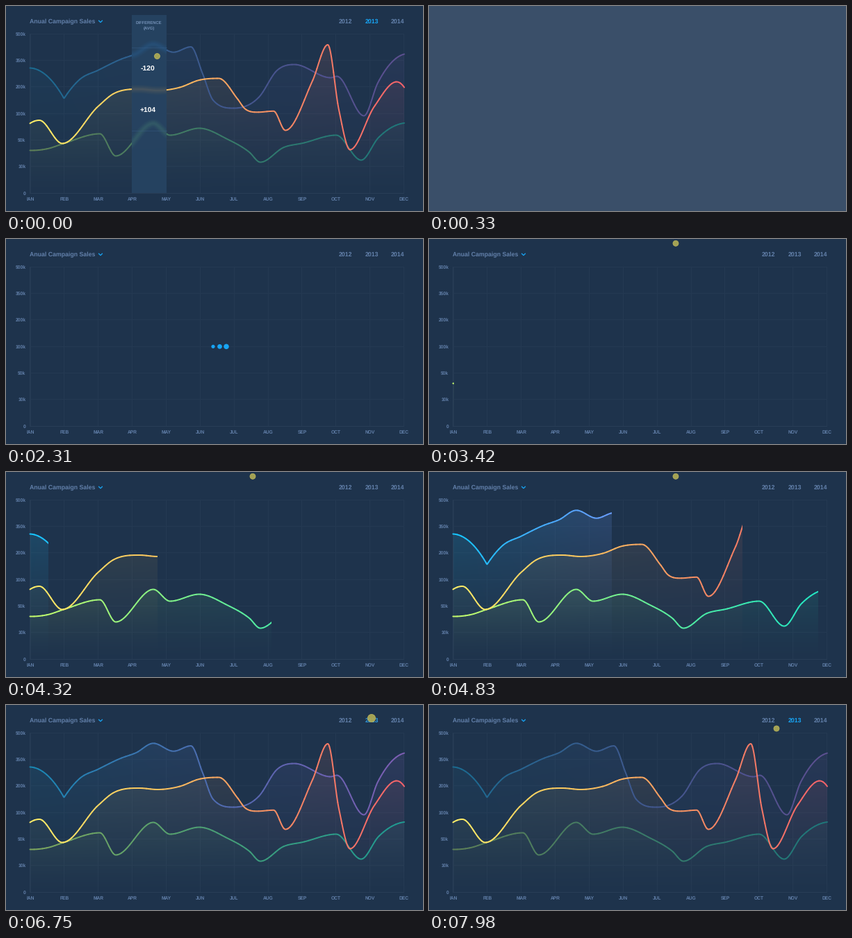
A matplotlib script that plays this animation: 600 px wide and 296 px high, repeating every 8000 ms.

```python
import numpy as np
import matplotlib.pyplot as plt
from matplotlib.animation import FuncAnimation
from matplotlib.collections import LineCollection
from matplotlib.colors import to_rgb
from matplotlib.patches import Circle, Rectangle
from matplotlib.transforms import Bbox

W, H, DPI = 600, 296, 100
LOOP, STEP = 8000, 20
PX = 72 / DPI
BG = np.array(to_rgb("#1e334c"))
FLAT = np.array(to_rgb("#3a4f69"))
LABEL = np.array(to_rgb("#6280aa"))
ACCENT = np.array(to_rgb("#17a5f5"))
LEFT, RIGHT, TOP, BOTTOM = 34.5, 573, 40, 270

plt.rcParams["font.family"] = "Liberation Sans"
plt.rcParams["font.weight"] = "bold"
plt.rcParams["text.hinting"] = "none"

X = np.linspace(LEFT, RIGHT, 1081)


def curve(*pts):
    """Smooth curve through key points, level at every peak and trough."""
    x, y = np.array(pts, float).T
    h = np.diff(x)
    d = np.diff(y) / h
    a, b = d[:-1], d[1:]
    m = (h[1:] * a + h[:-1] * b) / (h[1:] + h[:-1])
    limit = 3 * np.minimum(abs(a), abs(b))
    m = np.where(a * b > 0, np.clip(m, -limit, limit), 0)
    m = np.r_[2 * d[0] - m[0], m, 2 * d[-1] - m[-1]]
    k = np.clip(np.searchsorted(x, X) - 1, 0, len(h) - 1)
    s = np.clip((X - x[k]) / h[k], 0, 1)
    bend = h[k] * s * (1 - s) * (m[k] * (1 - s) - m[k + 1] * s)
    return y[k] + (y[k + 1] - y[k]) * smooth(s) + bend


def ramp(t, start, end):
    return min(max((t - start) / (end - start), 0), 1)


def smooth(u):
    return u * u * (3 - 2 * u)


KINK = 83.5
green_y = curve(
    (LEFT, 208.5), (60, 206), (83, 198.5), (135, 184.5), (158, 216.5),
    (212, 169.5), (236, 186.5), (278, 176.5), (318, 192), (350, 211),
    (366, 225.5), (400, 204), (427, 198), (475, 186.5), (511, 222.5),
    (536, 190), (RIGHT, 169))
amber_y = curve(
    (LEFT, 169.5), (48, 165), (81, 198.5), (133, 144.5), (155, 126.5),
    (192, 120), (218, 122), (250, 117.5), (278, 107), (306, 104.5),
    (333, 134), (344, 148.5), (362, 153.3), (385, 151.8), (402, 179.5),
    (441, 108), (463, 56), (479, 150), (495, 207.5), (530, 145),
    (562, 109.5), (RIGHT, 117.5))
blue_y = np.where(
    X < KINK,
    curve((LEFT, 89.5), (59, 101), (KINK, 133.5)),
    curve((KINK, 133.5), (105, 107), (133, 92.5), (165, 77), (187, 69),
          (212, 55.3), (241, 66.7), (266, 59), (283, 98), (298, 136),
          (328, 147.5), (364, 131.5), (390, 93), (415, 84.5), (467, 103.5),
          (476, 101.5), (515, 158.5), (535, 111), (RIGHT, 69.5)))


def gradient(colors, x):
    """Colours spread evenly across the chart."""
    at = np.linspace(LEFT, RIGHT, len(colors))
    rgb = np.array([to_rgb(c) for c in colors])
    return np.stack([np.interp(x, at, rgb[:, i]) for i in range(3)], axis=-1)


fig = plt.figure(figsize=(W / DPI, H / DPI), dpi=DPI, facecolor=BG)
ax = fig.add_axes([0, 0, 1, 1])
ax.set_xlim(0, W)
ax.set_ylim(H, 0)
ax.axis("off")

# Background with grid
months_x = np.linspace(35, 572.5, 12)
rows_y = np.linspace(TOP, BOTTOM, 7)
base = np.tile(BG, (H, W, 1))
grid = BG + 6 / 255
for gx in months_x:
    base[TOP:BOTTOM + 1, int(gx)] = grid
for gy in rows_y:
    base[int(gy + .3), 35:573] = grid
base[TOP:BOTTOM + 1, 34] = base[BOTTOM, 35:573] = BG + 10 / 255

backdrop = ax.imshow(base, extent=(0, W, H, 0), interpolation="nearest",
                     aspect="auto")


class Series:
    CHUNK = 12

    def __init__(self, y, colors, fill, start, span, focus, z):
        self.y, self.start, self.span, self.focus = y, start, span, focus
        cols = np.arange(W) + .5
        yy = np.arange(H)[:, None] + .5
        fade = np.clip((BOTTOM - yy) / (BOTTOM - y.min()), 0, 1) ** 1.4
        under = np.clip(yy - np.interp(cols, X, y) + .5, 0, 1)
        inside = (cols > LEFT) & (cols < RIGHT)
        self.area = (fill * fade * under * inside)[..., None]
        self.tint = gradient(colors, cols)
        pts = np.column_stack([X, y])
        starts = range(0, len(X) - 1, self.CHUNK)
        self.rgb = gradient(colors, X[::self.CHUNK][:len(starts)])
        self.line = LineCollection(
            [pts[i:i + self.CHUNK + 1] for i in starts], colors=self.rgb,
            linewidths=2 * PX, capstyle="round", zorder=z)
        ax.add_collection(self.line)

    def reach(self, t):
        if t < 830:
            return RIGHT + 2
        u = ramp(t, self.start, self.start + self.span)
        if u == 0:
            return 0
        end = RIGHT + 2 if u == 1 else RIGHT
        return LEFT + (end - LEFT) * (u + smooth(u)) / 2

    def update(self, img, reach, dim):
        drop = 0 if self.focus else dim
        self.line.set_clip_box(Bbox.from_extents(0, 0, reach, H))
        self.line.set_color(BG + (self.rgb - BG) * (1 - .62 * drop))
        n = int(round(reach))
        part = img[:, :n]
        part += (self.tint[:n] - part) * self.area[:, :n] * (1 - .65 * drop)


series = [
    Series(green_y, ["#c4fb6c", "#88f284", "#48eaa8", "#20e6c6"],
           .1, 3420, 1475, False, 2),
    Series(blue_y, ["#16c6ff", "#5aa2fa", "#9088fa", "#c47eff"],
           .18, 4220, 1390, False, 3),
    Series(amber_y, ["#ffee68", "#f9c45e", "#f68a64", "#f6626a"],
           .12, 3810, 1400, True, 4),
]


def label(x, y, s, px, ha="center", color=LABEL, z=5):
    return ax.text(x, y + .36 * px, s, fontsize=px * PX, ha=ha, va="baseline",
                   color=color, zorder=z)


label(34, 21.5, "Anual Campaign Sales", 8.8, "left")
ax.plot([133.6, 136, 138.4], [21.2, 23.6, 21.2], color=ACCENT, lw=1.3 * PX)
years = [label(488.5 + 37.5 * i, 21.8, str(2012 + i), 8.8) for i in range(3)]
for y, s in zip(rows_y, "500k 350k 200k 100k 50k 10k 0".split()):
    label(28.5, y + .2, s, 6.8, "right")
for x, s in zip(months_x,
                "IAN FEB MAR APR MAY JUN JUL AUG SEP OCT NOV DEC".split()):
    label(x + .3, 278.5, s, 6.6)

# Comparison band with softened curves behind it
band = [ax.add_patch(Rectangle((181, 13), 49.5, 257, fc="#264361", ec="none",
                               alpha=.96, zorder=6))]
for s, tone in zip(series, ("#4a8474", "#2f6ba2", "#77705e")):
    for width in (3, 5, 7, 9, 12):
        glow, = ax.plot(X, s.y, color=tone, alpha=.075, lw=width * PX, zorder=7)
        glow.set_clip_box(Bbox.from_extents(181, 0, 230.5, H))
        band.append(glow)
for y in (60, 180):
    band += ax.plot([181, 230.5], [y - .5] * 2, color="#3b618c", lw=PX, alpha=.4,
                    zorder=7)
band += [label(205.5, 24, "DIFFERENCE", 5.9, color="#7390b6", z=8),
         label(205.5, 31.3, "(AVG)", 5.9, color="#7390b6", z=8),
         label(204, 90.5, "-120", 10.4, color="white", z=8),
         label(204, 150, "+104", 10.2, color="white", z=8)]

dots = [ax.add_patch(Circle((298 + 9.5 * i, 155.3), 1, fc=ACCENT, ec="none",
                            zorder=5)) for i in range(3)]
cursor = ax.add_patch(Circle((0, 0), 4, fc="#aeab55", ec="#bdb75c", lw=.8 * PX,
                             alpha=.93, zorder=9))
cover = ax.add_patch(Rectangle((0, 0), W, H, ec="none", zorder=20))
scene = [a for a in ax.get_children() if a is not cover and a is not ax.patch]


def cover_state(t):
    if t < 30:
        return FLAT, 0
    if t < 830:
        return FLAT, min((int((t - 30) // 30) + 1) / 11, 1)
    if t < 890:
        return (FLAT + BG) / 2, 1
    return BG, float(t < 1150)


def move_cursor(t):
    if t < 830:
        x, y = 217.5, 72.5
    elif t < 7700:
        u = smooth(ramp(t, 5030, 5610))
        x, y = 355 + 171 * u, 6.3 + 12.7 * u
    else:
        u = ramp(t, 7700, 7990) ** 2
        x, y = 526 - 26 * u, 19 + 15 * u
    cursor.center = x, y
    cursor.set_radius(4 + 1.8 * np.sin(np.pi * ramp(t, 6510, 6870)))
    cursor.set_visible(t < 830 or t >= 3420)


def pulse_dots(t):
    for i, dot in enumerate(dots):
        u = (t - 1760 - 80 * i) / 700
        r = 3.8 * abs(np.sin(np.pi * u)) ** .8 if 0 < u < 2 else 0
        dot.set_radius(r)
        dot.set_visible(r > 0)


shown = None


def draw(i):
    global shown
    t = i * STEP + STEP / 2
    tone, alpha = cover_state(t)
    cover.set_facecolor(tone)
    cover.set_alpha(alpha)
    cover.set_visible(alpha > 0)
    for a in scene:
        a.set_visible(alpha < 1)
    if alpha == 1:
        return []

    dim = 1 if t < 830 else ramp(t, 6490, 6870)
    state = [s.reach(t) for s in series] + [dim]
    for s, reach in zip(series, state):
        s.line.set_visible(reach > 0)
    if state != shown:
        img = base.copy()
        for s, reach in zip(series, state):
            s.update(img, reach, dim)
        backdrop.set_data((img * 255 + .5).astype(np.uint8))
        shown = state
    years[1].set_color(LABEL + (ACCENT - LABEL) * dim)
    for a in band:
        a.set_visible(t < 830)
    pulse_dots(t)
    move_cursor(t)
    return []


anim = FuncAnimation(fig, draw, frames=LOOP // STEP, interval=STEP, repeat=True,
                     repeat_delay=0, init_func=lambda: draw(0), blit=False)
plt.show()
```
